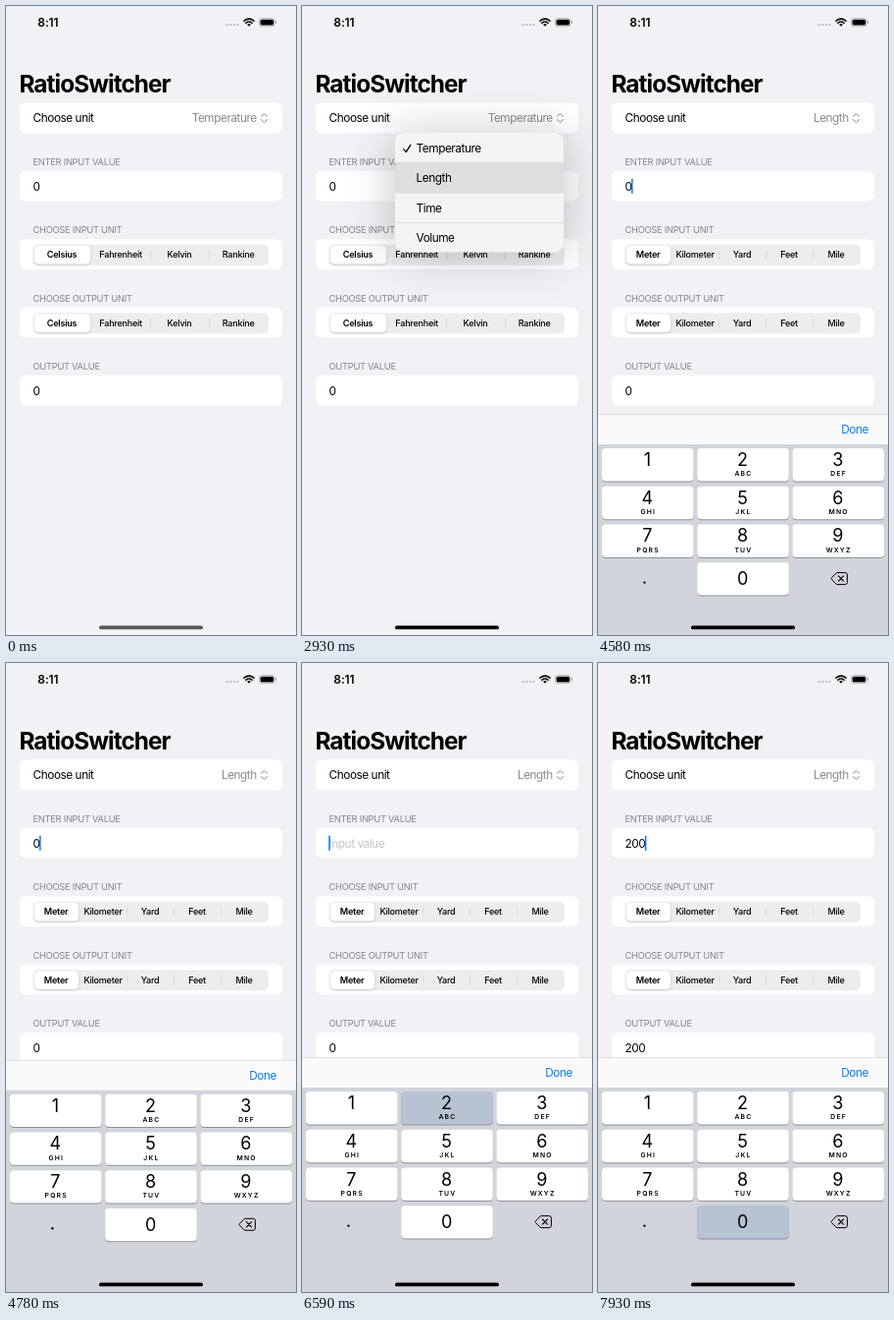
These frames come from a looping animation (296x640 px, 8 s). An HTML page:

```html
<!DOCTYPE html>
<html lang="en">
<head>
<meta charset="utf-8">
<title>Unit conversion</title>
<style>
html, body { margin: 0; width: 100%; height: 100%; overflow: hidden; background: #f2f1f6; }
svg { display: block; font-family: Inter, Roboto, sans-serif; }
text { white-space: pre; }
.body { font-size: 11.8px; letter-spacing: -.45px; }
.title { font-size: 24.4px; font-weight: 700; letter-spacing: -.95px; }
.head { font-size: 9.3px; letter-spacing: -.27px; fill: #85858a; }
.seg { font-size: 9.1px; font-weight: 500; letter-spacing: -.27px; text-anchor: middle; }
.on { font-weight: 600; }
.clock { font-size: 12px; font-weight: 600; letter-spacing: -.1px; }
.digit { font-size: 18px; text-anchor: middle; }
.abc { font-size: 6.8px; font-weight: 600; letter-spacing: 1.2px; text-anchor: middle; }
.end { text-anchor: end; }
.menu { filter: drop-shadow(0 2px 24px rgba(0, 0, 0, .23)); }
.thumb { filter: drop-shadow(0 1px 1.5px rgba(0, 0, 0, .18)); }
</style>
</head>
<body>
<svg id="stage" width="296" height="640" viewBox="0 0 296 640"></svg>
<script>
const LOOP = 8000;
const stage = document.getElementById('stage');
const TEMPERATURE = ['Celsius', 'Fahrenheit', 'Kelvin', 'Rankine'];
const LENGTH = ['Meter', 'Kilometer', 'Yard', 'Feet', 'Mile'];
const LETTERS = ['', 'ABC', 'DEF', 'GHI', 'JKL', 'MNO', 'PQRS', 'TUV', 'WXYZ'];

const rect = (x, y, w, h, r, fill, extra = '') =>
  `<rect x="${x}" y="${y}" width="${w}" height="${h}" rx="${r}" fill="${fill}" ${extra}/>`;
const text = (x, y, cls, s, fill = '') =>
  `<text x="${x}" y="${y}" class="${cls}"${fill && ` style="fill:${fill}"`}>${s}</text>`;
const line = (d, color, width) =>
  `<path d="${d}" fill="none" stroke="${color}" stroke-width="${width}" stroke-linecap="round" stroke-linejoin="round"/>`;
const card = y => rect(14, y, 268, 30.6, 6, '#fff');

const within = (t, a, b) => t >= a && t < b;
const step = (t, start, size) => start + Math.floor((t - start) / size) * size;
// Remaining distance of a critically damped spring, from 1 to 0.
const spring = x => x <= 0 ? 1 : (1 + x) * Math.exp(-x);

function statusBar() {
  let s = text(32.3, 20.8, 'clock', '8:11');
  for (let i = 0; i < 4; i++) s += `<circle cx="${225.6 + i * 3.6}" cy="19.2" r="1.1" fill="#b9b9bd"/>`;
  s += line('M242.8 15.3q5.2-4.4 10.4 0M244.8 17.3q3.2-2.6 6.4 0', '#000', 1.5);
  s += '<path d="M248 20.8l-1.9-2q1.9-1.4 3.8 0z"/>';
  s += rect(258.4, 12.5, 16, 8.2, 2.5, 'none', 'stroke="#adadb1" stroke-width=".8"');
  return s + rect(259.6, 13.7, 13.6, 5.8, 1.5, '#000') + rect(275.2, 15.3, 1, 2.6, .5, '#adadb1');
}

function segments(y, names) {
  const w = 240 / names.length;
  let s = rect(28, y, 240, 21, 5, '#ededef');
  s += rect(28.7, y + 1, w - 2.6, 18.8, 4.5, '#fff', 'class="thumb"');
  names.forEach((name, i) => {
    if (i > 1) s += rect(27.4 + i * w, y + 5.5, .7, 10, 0, '#d3d3d6');
    s += text(27.1 + (i + .5) * w, y + 13.5, i ? 'seg' : 'seg on', name);
  });
  return s;
}

function form(unit, unitColor, names, input, output) {
  let s = text(13.4, 88.4, 'title', 'RatioSwitcher');
  s += [98.6, 168, 237.3, 306.7, 376].map(card).join('');
  ['ENTER INPUT VALUE', 'CHOOSE INPUT UNIT', 'CHOOSE OUTPUT UNIT', 'OUTPUT VALUE']
    .forEach((label, i) => s += text(27.5, 161.8 + i * 69.35, 'head', label));
  s += text(27.6, 118.3, 'body', 'Choose unit');
  s += text(255.8, 118.3, 'body end', unit, unitColor);
  s += line('M260.5 112.4l3-2.9 3 2.9M260.5 115.6l3 2.9 3-2.9', unitColor, 1);
  s += text(27.6, 188, 'body', input || 'Input value', input ? '' : '#c5c5c8');
  s += segments(242.8, names) + segments(312.2, names);
  return s + text(27.6, 396.1, 'body', output);
}

function menu(scale, alpha, picked) {
  let s = rect(95, 129, 172, 121.5, 9, '#f4f4f7');
  if (picked) s += rect(95, 159.7, 172, 30, 0, '#dededf');
  ['Temperature', 'Length', 'Time', 'Volume'].forEach((name, i) => {
    const y = 129 + i * 30.4;
    if (i) s += rect(95, y, 172, .6, 0, '#d2d2d4');
    s += text(116.6, y + 19.9, 'body', name);
  });
  s += line('M103.8 145.6l2.4 3 4.6-7.2', '#000', 1.3);
  return `<g class="menu" opacity="${alpha}" transform="translate(240 120) scale(${scale}) translate(-240 -120)">${s}</g>`;
}

function key(x, y, digit, letters, down) {
  return rect(x, y + 1, 93.6, 33.4, 4, '#8f9196') + rect(x, y, 93.6, 33.4, 4, down ? '#b7c3d3' : '#fff') +
    text(x + 46.4, y + (digit ? 18 : 22.8), 'digit', digit) + text(x + 47.2, y + 28.2, 'abc', letters);
}

function keyboard(drop, pressed) {
  let s = rect(0, 401.5, 296, 31, 0, '#fafafb') + rect(0, 401.2, 296, .6, 0, '#cdcdd1');
  s += rect(0, 432, 296, 208, 0, '#d1d4da') + text(248.3, 421.3, 'body', 'Done', '#087bf5');
  LETTERS.forEach((abc, i) =>
    s += key(4 + i % 3 * 97.2, 436 + Math.floor(i / 3) * 38.75, i + 1, abc, pressed === i + 1));
  s += key(101.2, 552.2, 0, '', pressed === 0) + '<circle cx="47.4" cy="572.6" r="1.2"/>';
  const erase = pressed === 'erase';
  s += `<path d="M243.6 562.6h8.6q2.2 0 2.2 2.2v7.6q0 2.2-2.2 2.2h-8.6l-5-5q-1-1 0-2z"
    fill="${erase ? '#000' : 'none'}" stroke="#000"/>`;
  s += line('M245.4 566l5.2 5.2m0-5.2l-5.2 5.2', erase ? '#fff' : '#000', 1.1);
  return `<g transform="translate(0 ${drop.toFixed(2)})">${s}</g>`;
}

function pressedKey(t) {
  if (within(t, 5720, 6290)) return 'erase';
  if (within(t, 6590, 6840)) return 2;
  if (within(t, 7120, 7260) || within(t, 7410, 7660) || t >= 7930) return 0;
  return null;
}

function caretAlpha(t) {
  if (t < 4200 || within(t, 4940, 5340) || within(t, 6410, 6590)) return 0;
  return within(t, 6290, 6410) ? .4 : 1;
}

function draw(t) {
  const chosen = t >= 3040;
  const typed = '200'.slice(0, (t >= 6840) + (t >= 7260) + (t >= 7660));
  const input = t < 5840 ? '0' : typed;
  const unitColor = within(t, 500, 2930) ? '#b8b8bb' : '#8a8a8e';
  let s = rect(0, 0, 296, 640, 0, '#f2f1f6') + statusBar();
  s += form(chosen ? 'Length' : 'Temperature', unitColor, chosen ? LENGTH : TEMPERATURE, input, typed || '0');
  s += rect(27.2 + input.length * 6.9, 175.4, 1.5, 15.6, .75, '#0a7cf6', `opacity="${caretAlpha(t)}"`);

  if (within(t, 500, 2930)) {
    const open = t >= 950 ? 1 : 1 - spring((step(t, 500, 112) - 430) / 65);
    s += menu(open, Math.min(1, open * 1.3), false);
  } else if (within(t, 2930, 3040)) {
    s += menu(1, 1, true);
  } else if (within(t, 3040, 3140)) {
    s += menu(.5, .45, true);
  }
  if (t >= 4340) {
    const drop = t >= 5060 ? 0 : 239 * spring((step(t, 4340, 120) - 4300) / 61.5);
    s += keyboard(drop, pressedKey(t));
  }
  return s + rect(95, 630.6, 106, 3.7, 1.85, t < 2930 ? '#58585b' : '#000');
}

let shown = '';
function tick(now) {
  const picture = draw(now % LOOP);
  if (picture !== shown) stage.innerHTML = shown = picture;
  requestAnimationFrame(tick);
}
tick(0);
</script>
</body>
</html>
```
